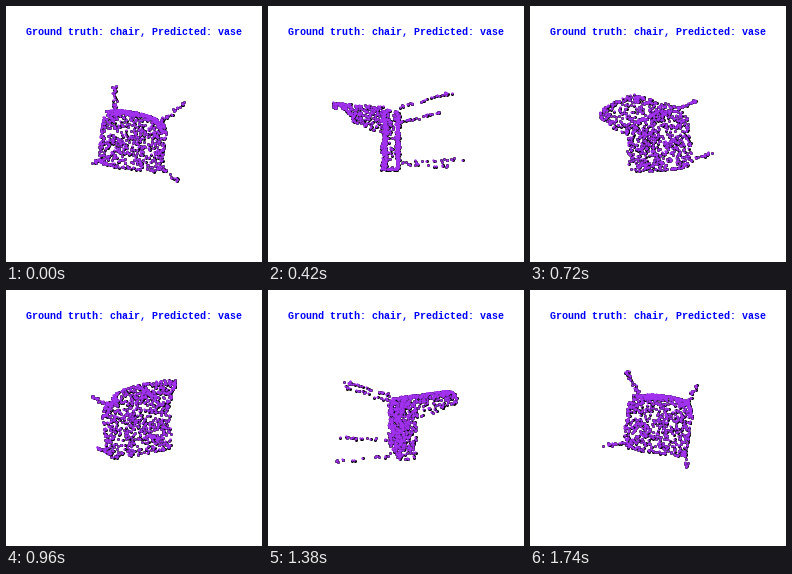
A matplotlib script for the animation above (1.8 s loop, 256 px wide and 256 px high).

```python
import numpy as np
import matplotlib.pyplot as plt
from matplotlib.animation import FuncAnimation

SIZE, DPI = 256, 100
FRAMES, INTERVAL = 30, 60
CAMERA = 235.0
PURPLE = "#a232f0"
rng = np.random.default_rng(7)


def px(n):
    return n * 72 / DPI


def bilinear(s, t, bl, br, tl, tr):
    a, b = (s[:, None] + 1) / 2, (t[:, None] + 1) / 2
    bl, br, tl, tr = map(np.array, (bl, br, tl, tr))
    return (1 - b) * ((1 - a) * bl + a * br) + b * ((1 - a) * tl + a * tr)


def seat(s, t, w):
    """Thick, slightly turned panel; w is the offset along its normal."""
    xy = bilinear(s, t, (-37, -30), (27, -39), (-31, 22), (32, 8))
    x = xy[:, 0]
    y = xy[:, 1] + 4 * (1 - s**2) * t.clip(0)
    return np.column_stack([x + 0.1 * w, y, -5 - 0.1 * x + w])


def seat_face(n, w):
    s, t = rng.uniform(-1, 1, (2, n))
    # pull the corners in so that they look rounded
    r = np.maximum(1, (np.abs(s) ** 7 + np.abs(t) ** 7) ** (1 / 7))
    return seat(s / r, t / r, w + rng.normal(0, 0.8, n))


def seat_rim(n):
    a = rng.uniform(0, 2 * np.pi, n)
    c, d = np.cos(a), np.sin(a)
    r = (np.abs(c) ** 7 + np.abs(d) ** 7) ** (1 / 7)
    return seat(c / r, d / r, rng.uniform(-6.5, 6.5, n))


def back(s, v):
    """Tapering shell whose sides fold down; v runs from seat to tip."""
    across = np.clip(s / 0.62, -1, 1)
    fold = np.clip((np.abs(s) - 0.62) / 0.38, 0, 1)
    p = bilinear(across, 2 * v - 1, (-30, 24, -6), (31, 10, -8),
                 (-20, 30, -58), (25, 20, -54))
    p[:, 0] += np.sign(s) * 3 * np.sqrt(fold) * (1 - v)
    p[:, 1] += 2 * (1 - across**2) - fold * (15 - 10 * v)
    return p


def leg(n, root, tip):
    k = rng.uniform(0, 1, n) ** 1.2
    k[0] = 1
    root, tip = np.array(root), np.array(tip)
    return root + k[:, None] * (tip - root) + rng.normal(0, 0.9, (n, 3))


cloud = np.vstack([
    seat_face(270, 6.5),
    seat_face(210, -6.5),
    seat_rim(90),
    back(rng.uniform(-1, 1, 230), rng.uniform(0, 1, 230)),
    back(rng.uniform(-1, 1, 45), rng.uniform(0.9, 1, 45)),
    leg(26, (-19, 24, 2), (-15.6, 39, 52)),
    leg(24, (27, 13, 0), (40, 25, 46)),
    leg(17, (26, -33, 0), (33, -35.4, 54)),
    leg(17, (-32, -23, 2), (-31, -22, 57)),
])


def project(angle):
    x, y, z = cloud.T
    c, s = np.cos(angle), np.sin(angle)
    scale = CAMERA / (CAMERA - (z * c - x * s))
    return np.column_stack([128 + (x * c + z * s) * scale, 128 - y * scale])


fig = plt.figure(figsize=(SIZE / DPI, SIZE / DPI), dpi=DPI, facecolor="white")
ax = fig.add_axes([0, 0, 1, 1])
ax.set(xlim=(0, SIZE), ylim=(SIZE, 0))
ax.axis("off")
ax.text(20, 29, "Ground truth: chair, Predicted: vase", color="blue",
        family="Liberation Mono", weight="bold", size=px(10), va="baseline")


def dots(color, width):
    return ax.scatter([], [], s=px(width) ** 2, c=color, linewidths=0,
                      antialiaseds=False)


shade = dots("black", 3.0)
fill = dots(PURPLE, 2.3)


def update(i):
    xy = project(2 * np.pi * i / FRAMES)
    shade.set_offsets(xy + 0.3)
    fill.set_offsets(xy)
    return shade, fill


anim = FuncAnimation(fig, update, frames=FRAMES, interval=INTERVAL,
                     repeat=True, repeat_delay=0)
plt.show()
```
